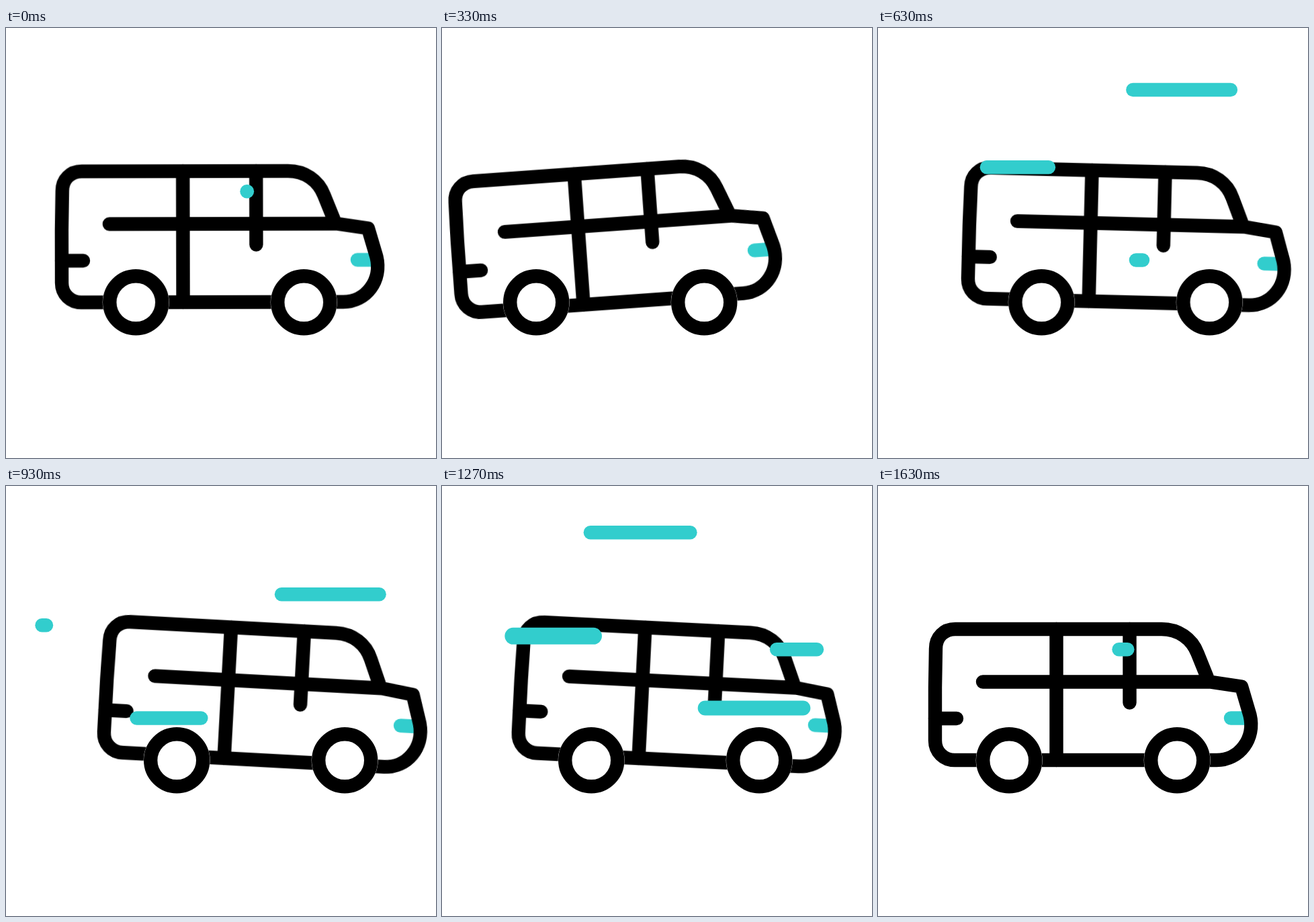
An HTML page without scripts that plays this animation: 640x640 px, repeating every 1670 ms.

```html
<!DOCTYPE html>
<html lang="en">
<head>
<meta charset="utf-8">
<title>Van on the move</title>
<style>
  @property --head { syntax: "<length>"; inherits: false; initial-value: 0px; }
  @property --tail { syntax: "<length>"; inherits: false; initial-value: 0px; }

  html, body { margin: 0; width: 100%; height: 100%; overflow: hidden; background: #fff; }
  svg { display: block; width: 100vw; height: 100vh; }

  .van, .body {
    animation: drive 1670ms cubic-bezier(.333, 0, .667, 1) -35ms infinite;
  }
  .body {
    animation-name: tilt;
    transform-origin: 320px 408px;
    fill: none;
    stroke: #000;
    stroke-width: 20.4;
    stroke-linecap: round;
    stroke-linejoin: round;
  }
  .lamp { stroke: #32cdcd; }

  @keyframes drive {
    0% { transform: translateX(0); }
    19.6% { transform: translateX(-57px); animation-timing-function: cubic-bezier(.4, 0, .6, 1); }
    45.2% { transform: translateX(59px); }
    63% { transform: translateX(59px); animation-timing-function: cubic-bezier(.3, 0, .4, 1); }
    100% { transform: translateX(0); }
  }
  @keyframes tilt {
    0% { transform: rotate(0deg); }
    22% { transform: rotate(-4.1deg); }
    48%, 74% { transform: rotate(3.1deg); }
    100% { transform: rotate(0deg); }
  }

  /* Wind streaks: --at is the start and --lag the tail's delay, in 1/50 of the loop */
  .wind path {
    --lag: 5.4;
    fill: none;
    stroke: #32cdcd;
    stroke-width: 20.4;
    stroke-linecap: round;
    stroke-dasharray: max(0px, var(--head) - var(--tail)) 900px;
    stroke-dashoffset: calc(-1 * var(--tail));
    animation: head 1670ms cubic-bezier(.333, 0, .667, 1) infinite,
               tail 1670ms cubic-bezier(.333, 0, .667, 1) infinite;
    animation-delay: calc((var(--at) - 50) * 33.4ms),
                     calc((var(--at) + var(--lag) - 50) * 33.4ms);
  }
  @keyframes head {
    0% { --head: 0px; visibility: visible; }
    19% { --head: 100px; }
    60% { visibility: visible; }
    60.1% { visibility: hidden; }
    100% { --head: 100px; visibility: hidden; }
  }
  @keyframes tail {
    0% { --tail: 0px; }
    19% { --tail: 100px; }
    19.01%, 70% { --tail: 200px; }
    70.01%, 100% { --tail: 0px; }
  }
</style>
</head>
<body>
<svg viewBox="0 0 640 640">
  <defs>
    <g id="wheel">
      <circle r="49.5" fill="#fff"/>
      <circle r="39" fill="#fff" stroke="#000" stroke-width="20.4"/>
    </g>
  </defs>

  <g class="van">
    <g class="body">
      <path class="lamp" d="M525 345.5H548"/>
      <path d="M490 285L475.500 249C467 227 447 213 422 213H115C98 213 86 225 86 242L85 300V379C85 396 98 408 114 408H504C538 408 562 376 553.500 341L541 298.500L494 291.500H156"/>
      <path d="M265.500 213V408M374.500 213V322.500M85 346H117"/>
    </g>
    <use href="#wheel" x="195.200" y="408.300"/>
    <use href="#wheel" x="445.200" y="408.300"/>
  </g>

  <g class="wind">
    <path pathLength="100" style="--at:12.6" d="M530 92H325"/>
    <path pathLength="100" style="--at:14.4;--lag:5" d="M254 207.200H53.500"/>
    <path pathLength="100" style="--at:17.6" d="M394 345.500H194.500"/>
    <path pathLength="100" style="--at:21.6" d="M560.500 161.200H355"/>
    <path pathLength="100" style="--at:31.6" d="M376.500 69.200H171"/>
    <path pathLength="100" style="--at:31.5;stroke-width:22" d="M545.500 330.500H346"/>
    <path pathLength="100" style="--at:32.6;stroke-width:25" d="M225.500 223.300H29.500"/>
    <path pathLength="100" style="--at:34.6;--lag:6.2" d="M558 243.200H358.500"/>
  </g>
</svg>
</body>
</html>
```
